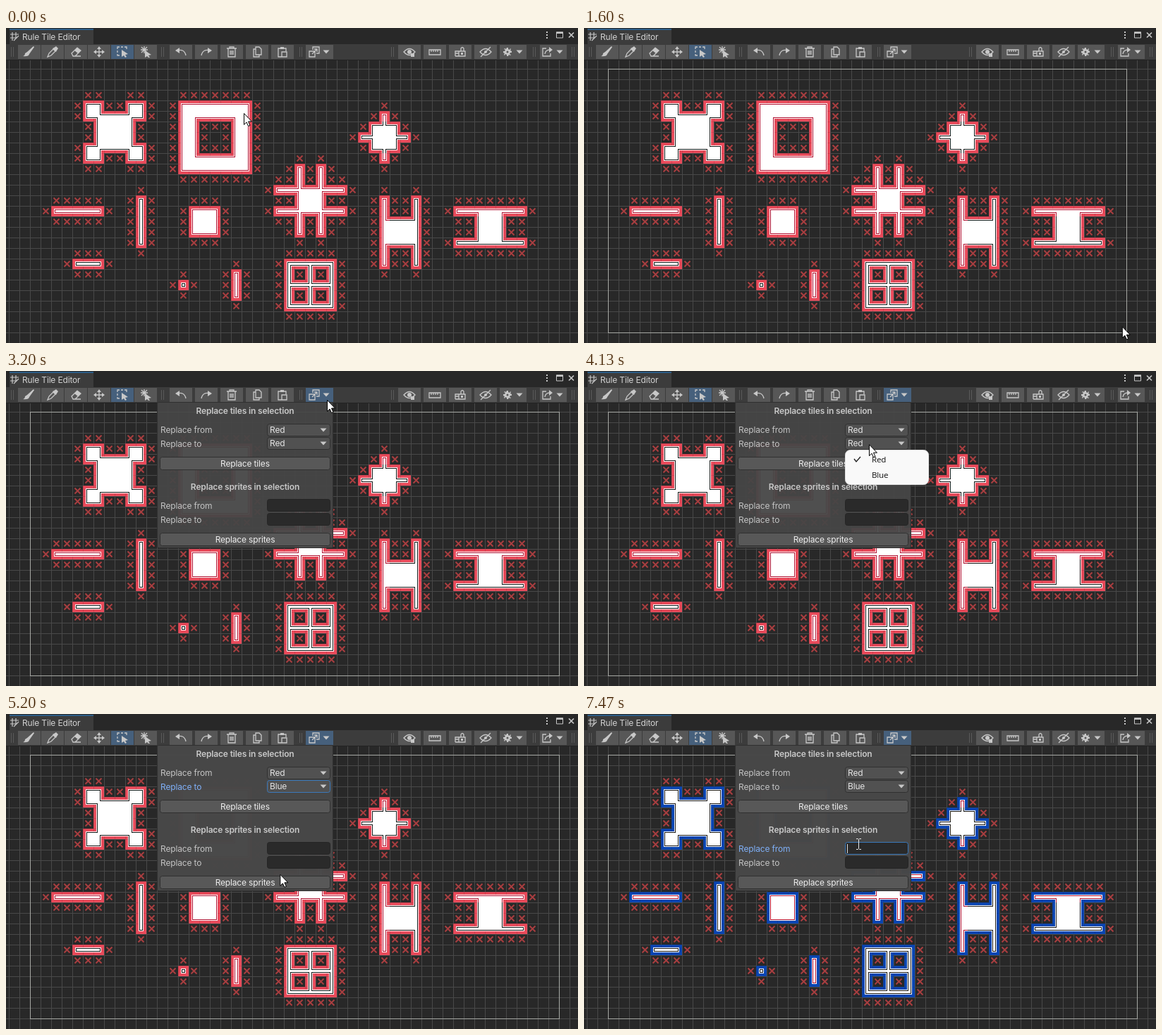
An HTML page with a canvas for the animation above (8 s loop, 811 by 448 pixels).

```html
<!DOCTYPE html>
<html lang="en">
<head>
<meta charset="utf-8">
<title>Rule Tile Editor</title>
<style>
html, body { margin: 0; width: 811px; height: 448px; overflow: hidden; background: #282828; }
canvas { display: block; }
</style>
</head>
<body>
<canvas id="stage" width="811" height="448"></canvas>
<script>
const ctx = document.getElementById('stage').getContext('2d');
const LOOP = 8000, CELL = 15, LEFT = 4, TOP = 43;
const BLACK = '#161616', CRIMSON = '#b01030', ICON = '#c8c8c8', ACTIVE = '#46607c';

// ---- tile map: "column,row" -> outline colour
const tiles = new Map();
const has = (c, r) => tiles.has(c + ',' + r);
function box(c, r, w, h, line) {
  for (let x = c; x < c + w; x++)
    for (let y = r; y < r + h; y++)
      line ? tiles.set(x + ',' + y, line) : tiles.delete(x + ',' + y);
}
for (const c of [7, 11]) for (const r of [4, 8]) box(c, r, 2, 2, BLACK);
box(8, 5, 4, 4, BLACK);
box(16, 4, 7, 7, CRIMSON);
box(18, 6, 3, 3);
box(35, 5, 1, 5, CRIMSON);
box(33, 7, 5, 1, BLACK);
box(34, 6, 3, 3, BLACK);
box(27, 12, 3, 3, CRIMSON);
for (const c of [27, 29]) box(c, 10, 1, 7, CRIMSON);
for (const r of [12, 14]) box(25, r, 7, 1, CRIMSON);
box(4, 14, 5, 1, CRIMSON);
box(12, 13, 1, 5, BLACK);
box(17, 14, 3, 3, CRIMSON);
box(6, 19, 3, 1, BLACK);
box(16, 21, 1, 1, BLACK);
box(21, 20, 1, 3, CRIMSON);
box(26, 19, 5, 5, BLACK);
for (const c of [27, 29]) for (const r of [20, 22]) box(c, r, 1, 1);
box(36, 15, 3, 3, BLACK);
box(35, 13, 1, 7, CRIMSON);
box(38, 13, 1, 7, BLACK);
box(44, 14, 3, 4, BLACK);
box(42, 14, 7, 1, CRIMSON);
box(42, 17, 7, 1, BLACK);

const cells = [...tiles].map(([key, line]) => [...key.split(',').map(Number), line]);
const crosses = new Set();
for (const [c, r] of cells)
  for (const [dx, dy] of [[1, 0], [-1, 0], [0, 1], [0, -1]])
    if (!has(c + dx, r + dy)) crosses.add((c + dx) + ',' + (r + dy));

// ---- pointer path: time, x, y
const path = [
  [0, 337, 121], [30, 337, 121], [340, 200, 203], [620, 50, 120], [770, 14, 51], [870, 37, 61], [930, 38, 62],
  [1290, 420, 270], [1600, 762, 424], [1730, 774, 424], [1800, 774, 424], [1870, 777, 424], [2050, 777, 424],
  [2200, 782, 423], [2380, 782, 423], [2780, 640, 200], [3110, 461, 47], [3200, 455, 41], [3250, 455, 41],
  [3650, 421, 82], [4000, 404, 104], [4120, 404, 104], [4390, 398, 150], [4670, 398, 150], [5020, 385, 242],
  [5300, 390, 210], [5470, 384, 171], [5800, 361, 130], [6780, 361, 130], [7000, 314, 116], [7330, 389, 185], [8000, 389, 185]
];
function slope(i, k) {
  const a = path[i - 1], b = path[i], c = path[i + 1];
  if (!a || !c || (a[1] === b[1] && a[2] === b[2]) || (b[1] === c[1] && b[2] === c[2])) return 0;
  return (c[k] - a[k]) / (c[0] - a[0]);
}
function pointerAt(t) {
  let i = 0;
  while (i < path.length - 2 && t >= path[i + 1][0]) i++;
  const a = path[i], b = path[i + 1], d = b[0] - a[0], u = (t - a[0]) / d;
  return [1, 2].map(k => {
    const blend = u * u * (3 - 2 * u);
    return a[k] + (b[k] - a[k]) * blend
      + d * (slope(i, k) * u * (1 - u) ** 2 - slope(i + 1, k) * u * u * (1 - u));
  });
}

// ---- drawing helpers
function rect(x, y, w, h, fill) { ctx.fillStyle = fill; ctx.fillRect(x, y, w, h); }
function panel(x, y, w, h, fill, border, radius = 3) {
  ctx.beginPath();
  ctx.roundRect(x + .5, y + .5, w - 1, h - 1, radius);
  ctx.fillStyle = fill;
  ctx.fill();
  if (border) { ctx.strokeStyle = border; ctx.lineWidth = 1; ctx.stroke(); }
}
function text(s, x, y, { color = '#c8c8c8', font = '12px Inter, sans-serif', align = 'left' } = {}) {
  ctx.font = font;
  ctx.letterSpacing = '-0.16px';
  ctx.textAlign = align;
  ctx.fillStyle = color;
  ctx.fillText(s, x, y);
}
function shape(x, y, line, solid, color = ICON, width = 1.3) {
  ctx.save();
  ctx.translate(x, y);
  ctx.strokeStyle = ctx.fillStyle = color;
  ctx.lineWidth = width;
  if (line) ctx.stroke(new Path2D(line));
  if (solid) ctx.fill(new Path2D(solid));
  ctx.restore();
}
const arrowDown = (x, y) => shape(x, y, '', 'M-4.5-2.5H4.5L0 2.5Z');

// ---- toolbar: button x, width, icon centre, strokes, fills
const gear = 'M-1-6H1V-4L3-3 4-5 5-4 4-2 6-1V1H4L3 3 5 4 4 5 2 4 1 6H-1V4L-3 3-4 5-5 4-4 2-6 1V-1H-4L-3-3-5-4-4-5-2-4ZM-1.5 0A1.5 1.5 0 1 0 1.5 0A1.5 1.5 0 1 0-1.5 0Z';
const eye = 'M-8 0Q0-9 8 0Q0 9-8 0Z';
const buttons = [
  [17, 32, 32, 'M7-7L0 1', 'M7-8L8-7 1 3-2 0ZM-2 0L1 3Q0 7-8 6Q-5 5-5 2Z'],
  [50, 32, 66, 'M-7 7L-5 2 1-4 4-1-2 5Z', 'M0-5L2-6 5-8 8-5 6-2 5 0Z'],
  [83, 32, 99, 'M-6 2L2-6 7-2-1 6H-4ZM-2 6H7', 'M-2-2L2-6 7-2 3 2Z'],
  [116, 32, 132, 'M-6 0H6M0-6V6', 'M0-8L3-4H-3ZM0 8L3 4H-3ZM-8 0L-4-3V3ZM8 0L4-3V3Z'],
  [149, 32, 165, 'M-7-4V-7H-4M-2-7H1M3-7H6V-4M-7-2V1M-7 3V5H-4', 'M-1-3L8 3 4 4 6 7 4 8 2 5-1 7Z'],
  [182, 32, 198, 'M-7-3H3M-2-8V2M-6-7L2 1M2-7L-6 1', 'M-1-2L8 4 4 5 6 8 4 8 2 6-1 8Z'],
  [232, 32, 248, 'M-6-2Q5-5 7 5', 'M-8-2L-2-6V2Z'],
  [268, 32, 284, 'M6-2Q-5-5-7 5', 'M8-2L2-6V2Z'],
  [304, 32, 320, 'M-7-5H7M-3-5V-7H3V-5M-5-5V7H5V-5M-2-2V4M0-2V4M2-2V4', ''],
  [340, 32, 356, 'M-2-7H3L6-4V4H-2ZM-2-4H-5V7H3V4', ''],
  [376, 32, 392, 'M1 7H-6V-5H5V-1M-1 0H6V7H-1Z', 'M-3-7H2V-4H-3Z'],
  [425, 39, 437, 'M-7-1H1V7H-7ZM-2-3V-7H7V2H3M-3 3L3-3M0-4H4V0', ''],
  [556, 32, 572, eye, 'M-3 0A3 3 0 1 0 3 0A3 3 0 1 0-3 0ZM2 2H7V7H2Z'],
  [592, 32, 608, 'M-8-3H8V4H-8ZM-5-3V0M-2-3V0M1-3V0M4-3V0', ''],
  [628, 32, 644, 'M-7 6V-1H-2M-7 6H7V-1H-2V6M1-1V-5Q3-8 5-5V-1M-7 2H-2', 'M1 1H4V4H1Z'],
  [664, 32, 680, eye + 'M-7 7L7-7', 'M-2 0A2 2 0 1 0 2 0A2 2 0 1 0-2 0Z'],
  [700, 38, 711, '', gear],
  [757, 38, 767, 'M-1-5H-6V6H5V2M-3 3Q-2-3 4-3', 'M3-7L8-3 3 1Z']
];

function drawGrid() {
  rect(0, 46, 811, 402, '#282828');
  for (let x = LEFT; x < 811; x += CELL) rect(x, 46, 1, 402, '#494949');
  for (let y = TOP + CELL; y < 448; y += CELL) rect(0, y, 811, 1, '#494949');
}
// Fills the part of a cell that lies at least `inset` away from any empty cell.
function fillInset(c, r, inset, color) {
  const start = [0, inset, CELL - inset], size = [inset, CELL - 2 * inset, inset];
  for (let i = 0; i < 3; i++)
    for (let j = 0; j < 3; j++)
      if (has(c + i - 1, r) && has(c, r + j - 1) && has(c + i - 1, r + j - 1))
        rect(LEFT + c * CELL + start[i], TOP + r * CELL + start[j], size[i], size[j], color);
}
function drawTiles(color) {
  for (const [c, r, line] of cells) {
    const x = LEFT + c * CELL, y = TOP + r * CELL;
    rect(x, y, CELL, CELL, color);
    rect(x, y, CELL, 1, 'rgba(40,40,40,.15)');
    rect(x, y, 1, CELL, 'rgba(40,40,40,.15)');
    fillInset(c, r, 4, '#fff');
    fillInset(c, r, 5, line);
    fillInset(c, r, 6, '#fff');
  }
  for (const key of crosses) {
    const [c, r] = key.split(',');
    shape(LEFT + c * CELL + 7.5, TOP + r * CELL + 7.5, 'M-4-4L4 4M4-4L-4 4', '', '#a83e40', 2);
  }
}
function drawSelection(t) {
  if (t < 920) return;
  const [x, y] = pointerAt(Math.min(t, 2300));
  const snap = (v, origin) => origin + CELL * (Math.floor((v - origin) / CELL) + 1);
  ctx.strokeStyle = '#a6a8a4';
  ctx.lineWidth = 1;
  ctx.strokeRect(34.5, 58.5, snap(x, LEFT) - 34, Math.min(433, snap(y, TOP)) - 58);
}
function drawChrome(menuOpen) {
  rect(0, 0, 811, 23, '#282828');
  rect(5, 2, 119, 21, '#3c3c3c');
  rect(5, 1, 119, 2, '#2c5d87');
  shape(12, 12, 'M-3-6V6M2-6V2M-6-3H6M-6 2H2M-1 6L6-1', '', ICON, 1.2);
  text('Rule Tile Editor', 23, 17, { color: '#d2d2d2' });
  for (const y of [5, 9, 13]) rect(766, y, 2, 2, ICON);
  shape(785, 10, 'M-4.5-4H4.5V4H-4.5Z', 'M-5-4.5H5V-2H-5Z', ICON, 1);
  shape(801.5, 10, 'M-3.5-3.5L3.5 3.5M3.5-3.5L-3.5 3.5', '', ICON, 1.7);
  rect(0, 23, 811, 23, '#3c3c3c');
  rect(0, 45, 811, 1, '#232323');
  for (const x of [7, 220, 416, 546, 747, 802])
    for (const dx of [0, 3]) rect(x + dx, 27, 1, 14, '#595959');
  for (const [x, w, center, line, solid] of buttons) {
    const on = x === 149 || (x === 425 && menuOpen);
    rect(x, 24, w, 20, on ? ACTIVE : '#575757');
    shape(center, 34, line, solid);
    if (w > 32) arrowDown(x + w - 10, 34);
  }
}
function drawMenu(t) {
  const target = t >= 4670 ? 'Blue' : 'Red';
  const focus = t >= 7440 ? 'field' : t >= 4670 ? 'target' : '';
  const label = (s, y, lit) => text(s, 219, y, { color: lit ? '#7fb0f8' : '#c4c4c4' });
  const heading = (s, y) => text(s, 339, y, { font: '600 12px Inter, sans-serif', align: 'center' });
  const edge = lit => lit ? '#3a79bb' : '#252525';
  const dropdown = (value, y, lit) => {
    panel(370, y, 90, 18, '#515151', lit ? edge(true) : '#303030');
    text(value, 374, y + 13, { color: '#e4e4e4' });
    arrowDown(450, y + 9);
  };
  const button = (s, y, pressed) => {
    panel(218, y, 242, 19, pressed ? ACTIVE : '#585858', '#303030');
    text(s, 339, y + 14, { color: '#eee', align: 'center' });
  };
  panel(214, 44, 250, 208, t < 4670 ? 'rgba(70,70,70,.95)' : 'rgba(72,72,72,.985)', '#303030', 2);
  heading('Replace tiles in selection', 61);
  label('Replace from', 88);
  dropdown('Red', 75);
  label('Replace to', 108, focus === 'target');
  dropdown(target, 94, focus === 'target');
  button('Replace tiles', 122, t >= 5900 && t < 6070);
  heading('Replace sprites in selection', 169);
  label('Replace from', 196, focus === 'field');
  panel(370, 182, 90, 18, '#2a2a2a', edge(focus === 'field'));
  if (focus === 'field') rect(373, 185, 1, 13, '#ddd');
  label('Replace to', 216);
  panel(370, 202, 90, 18, '#2a2a2a', edge(false));
  button('Replace sprites', 230);
}
function drawPopup(t) {
  const font = '11.6px "Open Sans", sans-serif';
  const hover = t >= 4330;
  if (t < 4060 || t >= 4730) return;
  if (t >= 4670) rect(373, 137, 113, 22, 'rgba(205,205,205,.9)');
  else {
    panel(370, 112, 119, 50, '#f9f9f9', '#e2e2e2', 7);
    shape(387, 126, 'M-4-1L-1 3 5-4', '', '#222', 1.4);
    text('Red', 408, 130, { color: '#111', font });
  }
  if (hover) panel(379, 140, 101, 16, '#1268b3', '', 3);
  text('Blue', 408, 152, { color: hover ? '#d8ecff' : '#111', font });
}
function drawPointer(t) {
  const [x, y] = pointerAt(t);
  if (t > 7250) {
    shape(x + .5, y, 'M-3.5-7.5H-1L0-6.5 1-7.5H3.5M0-6.5V6.5M-3.5 7.5H-1L0 6.5 1 7.5H3.5', '', '#e8e8e8', 1);
    return;
  }
  const arrow = 'M.5.5V16.5L4 13 6.5 18.5 9 17.5 6.5 12H11.5Z';
  shape(x, y, '', arrow, '#fff');
  shape(x, y, arrow, '', '#000', 1);
}

function frame(now) {
  const t = now % LOOP, menuOpen = t >= 3150;
  drawGrid();
  drawTiles(t < 6070 ? '#e84a5a' : '#0a45b2');
  drawSelection(t);
  drawChrome(menuOpen);
  if (menuOpen) drawMenu(t);
  drawPopup(t);
  drawPointer(t);
  requestAnimationFrame(frame);
}
const origin = performance.now();
requestAnimationFrame(() => frame(0));
const tick = frame;
frame = () => tick(Math.max(0, performance.now() - origin));
</script>
</body>
</html>
```
